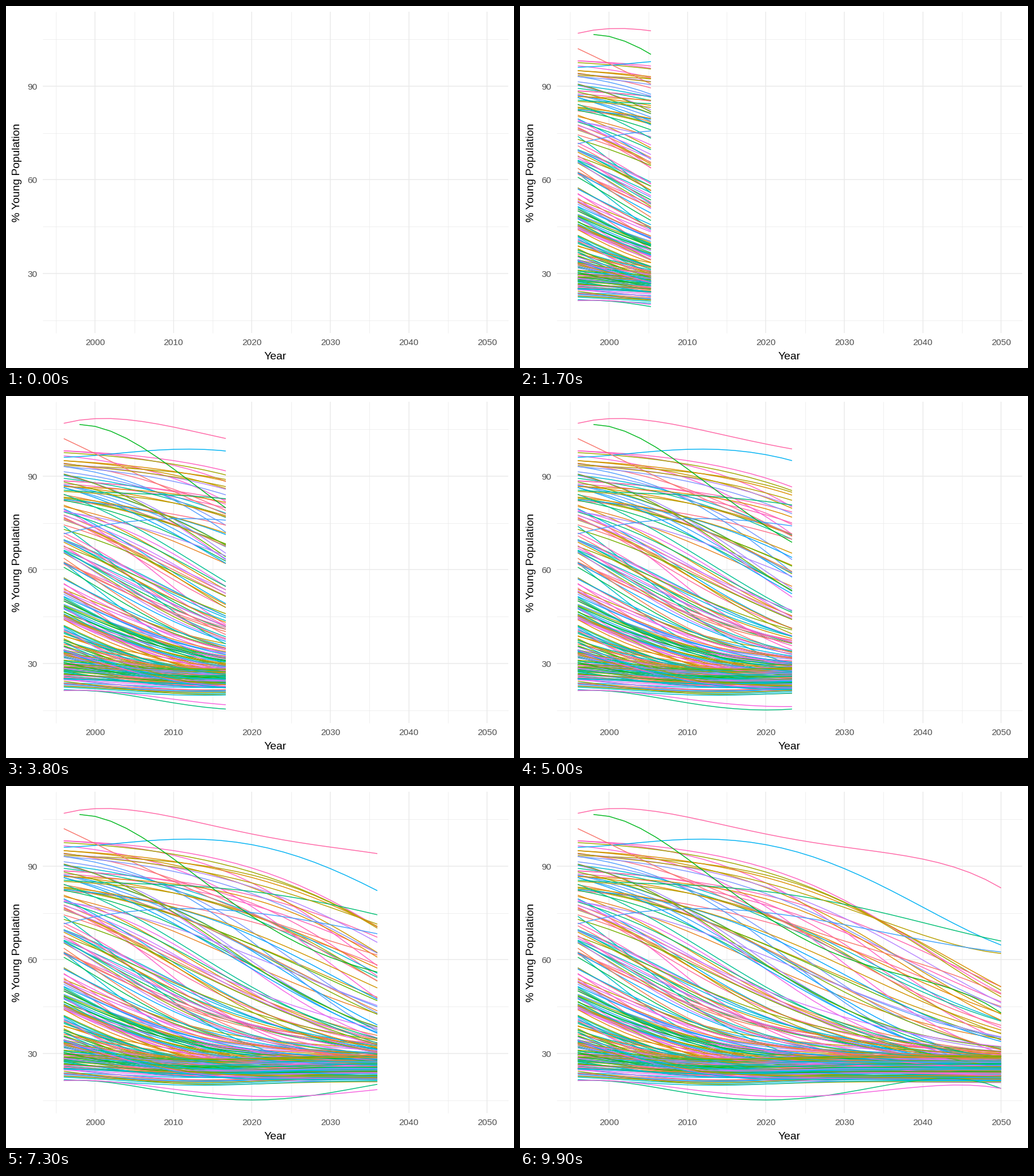
These frames come from a looping animation (885x632 px, 10 s). A matplotlib script:

```python
import numpy as np
import matplotlib.pyplot as plt
from matplotlib.animation import FuncAnimation
from matplotlib.collections import LineCollection

W, H, DPI = 885, 632, 100
FRAMES, INTERVAL = 100, 100
PX = 72 / DPI
LEFT, RIGHT, TOP, BOTTOM = 64, 875, 9.5, 571
GRID, TICK = "#EBEBEB", "#4D4D4D"

YEARS = np.arange(1996, 2051, 2)
KNOTS = np.round(np.linspace(0, FRAMES - 1, len(YEARS)))
COUNT = 215

# Countries outside the crowd: hue, then values in the key years
KEYS = np.array([1996, 2003, 2016, 2032, 2050])
OUTLIERS = np.array([
    (350, 106.9, 108.3, 102.4, 95.4, 83),
    (228, 96, 97.3, 98.2, 87, 64.7),
    (15, 102, 93.5, 78.5, 64.5, 49),
    (155, 85.5, 84.6, 82.9, 76.7, 66),
    (75, 94, 92, 87, 75, 62),
    (250, 71.5, 75, 76, 70.3, 62.5),
    (158, 21.3, 20.3, 15.5, 18.3, 18.8),
    (318, 21.3, 20.7, 16.9, 17.4, 18.8),
    (130, 106, 103.3, 81, 59, 43),
])


def hcl(hue, chroma=100, light=65):
    """Polar LUV colour as sRGB."""
    a = np.radians(hue)
    u = chroma * np.cos(a) / (13 * light) + 0.1978
    v = chroma * np.sin(a) / (13 * light) + 0.4683
    y = ((light + 16) / 116) ** 3
    x = 2.25 * y * u / v
    z = 3 * y / v - x / 3 - 5 * y
    lin = np.array([3.2406 * x - 1.5372 * y - 0.4986 * z,
                    -0.9689 * x + 1.8758 * y + 0.0415 * z,
                    0.0557 * x - 0.2040 * y + 1.0570 * z]).clip(0, 1)
    return np.where(lin > 0.0031308, 1.055 * lin ** (1 / 2.4) - 0.055, 12.92 * lin)


def crowd(rng):
    """Logistic falls from a high to a low share, each around its own year."""
    v = np.linspace(-1, 1, COUNT)[:, None]
    middle = 1986 + 58 * np.sign(v) * np.abs(v) ** 1.5
    floor, top, pace = (rng.uniform(a, b, (COUNT, 1))
                        for a, b in ((20.5, 29.5), (84, 100), (9, 15)))
    share = 1 / (1 + np.exp((YEARS - middle) / pace))
    dip = 1.6 * np.exp(-((YEARS - 2013) / 12) ** 2) * (1 - share)
    return floor + (top - floor) * share - dip


def through(values):
    """Polynomial through the values in the key years."""
    mid, half = 2023, 27
    fit = np.polyfit((KEYS - mid) / half, values, len(KEYS) - 1)
    return np.polyval(fit, (YEARS - mid) / half)


def px(year):
    return 155.3 + (year - 2000) * 13.656


def py(value):
    return 139.8 + (90 - value) * 5.452


rng = np.random.default_rng(4)
outer = np.array([through(row[1:]) for row in OUTLIERS])
outer[-1, 0] = np.nan  # this series starts one step late
VALUES = np.vstack([rng.permutation(crowd(rng)), outer])
hues = np.append(rng.permutation(np.linspace(15, 375, COUNT, endpoint=False)), OUTLIERS[:, 0])

fig = plt.figure(figsize=(W / DPI, H / DPI), dpi=DPI, facecolor="white")
ax = fig.add_axes([0, 0, 1, 1])
ax.set(xlim=(0, W), ylim=(H, 0))
ax.axis("off")


def label(x, y, text, size, color="black", ha="center", **kw):
    ax.text(x, y, text, fontsize=size * PX, color=color, ha=ha, va="baseline",
            family="Liberation Sans", **kw)


for first_year, first_value, width in ((1995, 15, 0.8), (2000, 30, 1.5)):
    style = dict(colors=GRID, linewidths=width * PX, zorder=width)
    ax.vlines(px(np.arange(first_year, 2051, 10)), TOP, BOTTOM, **style)
    ax.hlines(py(np.arange(first_value, 106, 30)), LEFT, RIGHT, **style)

for year in range(2000, 2051, 10):
    label(px(year), 592.5, str(year), 15.4, TICK)
for value in (30, 60, 90):
    label(54.8, py(value) + 6, str(value), 15.4, TICK, ha="right")
label(469.3, 617.3, "Year", 19.3)
label(24.5, 290.8, "% Young Population", 19.3, rotation=90, rotation_mode="anchor")

lines = LineCollection([], colors=[hcl(h) for h in hues], linewidths=1.45 * PX,
                       capstyle="butt", zorder=3)
ax.add_collection(lines, autolim=False)


def draw(i):
    now = np.interp(i, KNOTS, YEARS)
    k = min(int((now - YEARS[0]) // 2), len(YEARS) - 2)
    part = (now - YEARS[k]) / 2
    tip = VALUES[:, k] + part * (VALUES[:, k + 1] - VALUES[:, k])
    xs = px(np.append(YEARS[:k + 1], now))
    ys = py(np.column_stack([VALUES[:, :k + 1], tip]))
    lines.set_segments([np.column_stack([xs, y]) for y in ys] if i else [])
    return lines,


anim = FuncAnimation(fig, draw, frames=FRAMES, interval=INTERVAL,
                     repeat=True, repeat_delay=0, blit=False)
plt.show()
```
